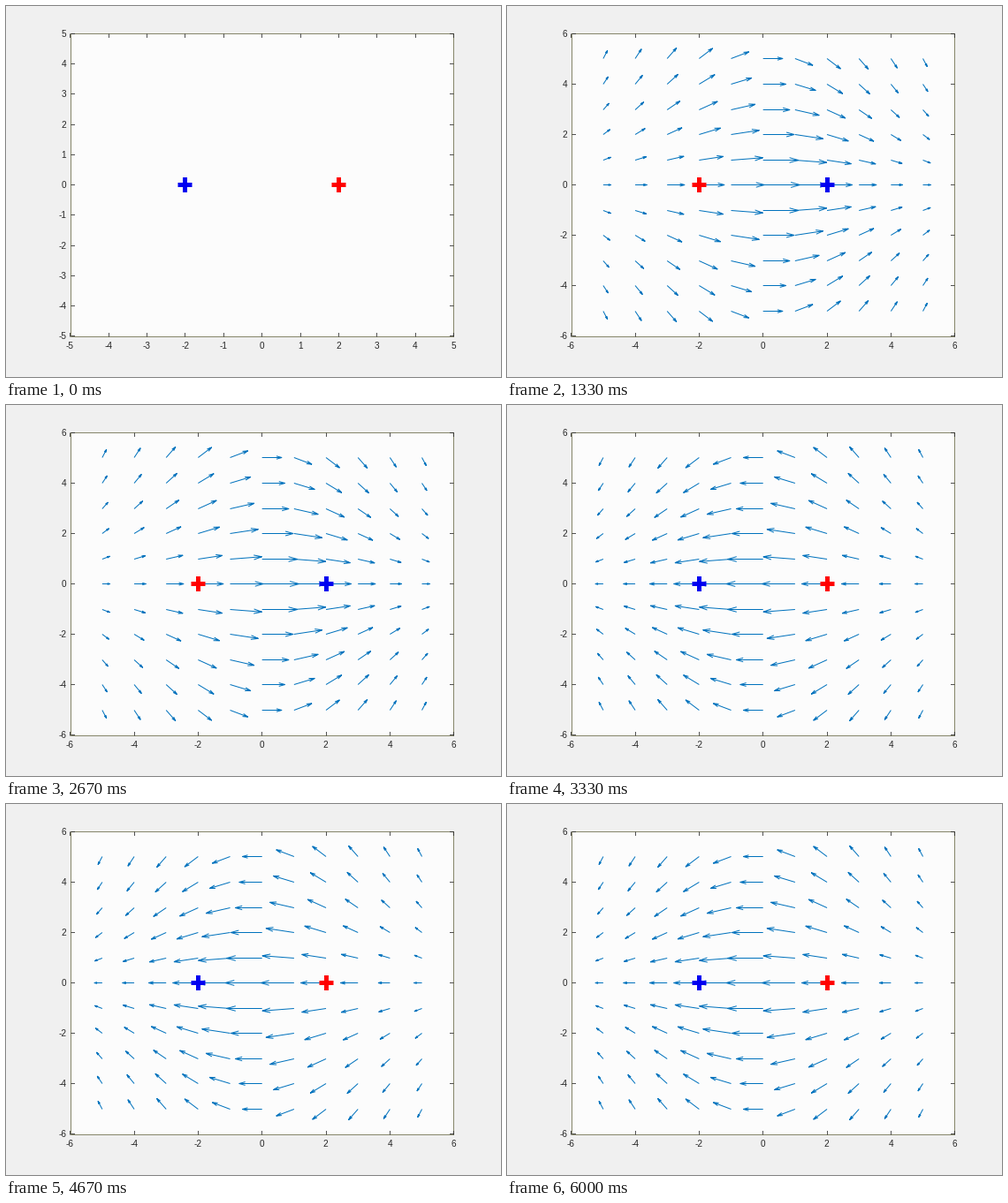
Recreate the animation shown at these times as a matplotlib script. Size 560x420 px, loop 6.66 s.

```python
import numpy as np
import matplotlib.pyplot as plt
from matplotlib.animation import FuncAnimation

W, H, DPI = 560, 420, 100
LEFT, RIGHT, TOP, BOTTOM = 73.5, 506.5, 31.5, 374.5
CX, CY = 289.7, 202.6
SPAN_X, SPAN_Y = 434, 342.3
PT = 72 / DPI  # points per pixel

INTERVAL, FRAMES = 10, 666
INTRO = 3
SWITCHES = [round(200 * j / 3) for j in range(1, 10)]

PAPER, INSIDE, BORDER = "#f0f0f0", "#fcfcfc", "#86866a"
INK, ARROW, RED, BLUE = "#262626", "#0072bd", "#ff0000", "#0000f0"

plt.rcParams["font.family"] = "Liberation Sans"
fig = plt.figure(figsize=(W / DPI, H / DPI), dpi=DPI, facecolor=PAPER)
ax = fig.add_axes([0, 0, 1, 1])
ax.set_xlim(0, W)
ax.set_ylim(H, 0)
ax.axis("off")


def path(xs, ys, color, width, z):
    line, = ax.plot(xs, ys, color=color, lw=width * PT, zorder=z, snap=False,
                    solid_capstyle="butt", solid_joinstyle="miter")
    return line


def scale(limit):
    return SPAN_X / 2 / limit, SPAN_Y / 2 / limit


def pixel_centre(v):
    return np.floor(v) + 0.5


def make_scale(limit, step):
    """Tick marks on all four sides, with labels left and below."""
    sx, sy = scale(limit)
    xs, ys, parts = [], [], []
    style = dict(fontsize=10 * PT, color=INK, va="baseline")
    for v in range(-limit, limit + 1, step):
        x, y = CX + v * sx, CY - v * sy
        px, py = pixel_centre(x), pixel_centre(y)
        for edge, inward in ((BOTTOM, -4.5), (TOP, 4.5)):
            xs += [px, px, np.nan]
            ys += [edge, edge + inward, np.nan]
        for edge, inward in ((LEFT, 4.5), (RIGHT, -4.5)):
            xs += [edge, edge + inward, np.nan]
            ys += [py, py, np.nan]
        parts.append(ax.text(x - 0.3, 388.2, str(v), ha="center", **style))
        parts.append(ax.text(68.2, y + 3.5, str(v), ha="right", **style))
    parts.append(path(xs, ys, INK, 0.8, 3))
    return parts


def make_charges(limit, red_x):
    sx, _ = scale(limit)
    parts = []
    for v, color in ((red_x, RED), (-red_x, BLUE)):
        x, y = pixel_centre(CX + v * sx), pixel_centre(CY)
        parts.append(path([x - 8, x + 8], [y, y], color, 5, 5))
        parts.append(path([x, x], [y - 8.5, y + 8.5], color, 5, 5))
    return parts


def make_field(limit, direction):
    """Arrows on the unit grid, flowing from the red charge to the blue one."""
    sx, sy = scale(limit)
    gx, gy = (g.ravel() for g in np.meshgrid(np.arange(-5, 6), np.arange(-5, 6)))
    strength = 1.157 / np.sqrt(1 + gy**2 / 10) / (1 + gx**2 / 14) ** 1.5
    dx = direction * strength * sx
    dy = direction * strength * 0.096 * gx * gy * sy
    x, y = CX + gx * sx, pixel_centre(CY - gy * sy)
    tip_x, tip_y = x + dx, y + dy

    length = np.hypot(dx, dy)
    ux, uy = dx / length, dy / length
    head = 0.22 * length + 1.2
    half = 0.28 * head
    back_x, back_y = tip_x - head * ux, tip_y - head * uy
    gap = np.full_like(x, np.nan)
    xs = np.stack([x, tip_x, gap, back_x - half * uy, tip_x, back_x + half * uy, gap], 1)
    ys = np.stack([y, tip_y, gap, back_y + half * ux, tip_y, back_y - half * ux, gap], 1)
    return [path(xs.ravel(), ys.ravel(), ARROW, 1, 4)]


ax.fill([LEFT, RIGHT, RIGHT, LEFT], [TOP, TOP, BOTTOM, BOTTOM], color=INSIDE, lw=0, zorder=1)
path([LEFT, RIGHT, RIGHT, LEFT, LEFT], [TOP, TOP, BOTTOM, BOTTOM, TOP], BORDER, 1, 2)

intro = make_scale(5, 1) + make_charges(5, 2)
wide_scale = make_scale(6, 2)
leftward = make_charges(6, 2) + make_field(6, -1)
rightward = make_charges(6, -2) + make_field(6, 1)


def show(parts, visible):
    for part in parts:
        part.set_visible(visible)


def update(frame):
    started = frame >= INTRO
    flipped = sum(frame >= s for s in SWITCHES) % 2 == 1
    show(intro, not started)
    show(wide_scale, started)
    show(leftward, started and flipped)
    show(rightward, started and not flipped)
    return []


anim = FuncAnimation(fig, update, frames=FRAMES, interval=INTERVAL,
                     repeat=True, repeat_delay=0, blit=False)
plt.show()
```
